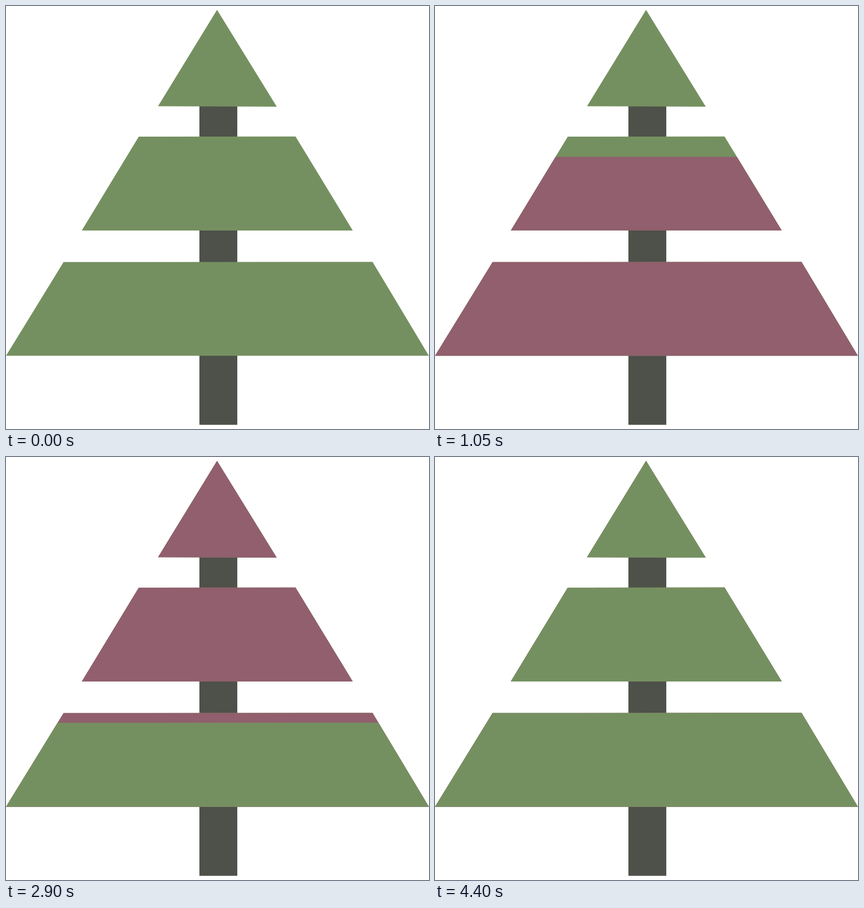
An HTML page that plays this animation: 748x748 px, repeating every 5 s.

```html
<!DOCTYPE html>
<html lang="en">
<head>
<meta charset="utf-8">
<title>Tree</title>
<style>
  html, body { margin: 0; width: 100%; height: 100%; overflow: hidden; background: #fff; }
  svg { display: block; width: 100%; height: 100%; }
</style>
</head>
<body>
<svg id="stage" viewBox="0 0 748 748">
  <rect x="342" y="100" width="67" height="640.6" fill="#4e5149"/>
</svg>
<script>
const LOOP = 5000, STEP = 50, STEPS = 10;
const GREEN = '#759060', RED = '#915f6d';

// Corners: top left, top right, bottom right, bottom left.
const tiers = [
  { corners: [[101.8, 452.8], [648.2, 452.4], [747.8, 618.6], [0, 618.6]], red: 50, green: 2550 },
  { corners: [[234.8, 230.9], [512, 230.7], [613.2, 397.1], [134, 397.1]], red: 750, green: 3250 },
  { corners: [[373.2, 6.8], [373.2, 6.8], [478.8, 178], [268.8, 177.2]], red: 1450, green: 3950 }
];

const stage = document.getElementById('stage');

function addShape(fill) {
  const shape = document.createElementNS('http://www.w3.org/2000/svg', 'polygon');
  shape.setAttribute('fill', fill);
  return stage.appendChild(shape);
}

const mix = (a, b, amount) => a.map((v, i) => v + (b[i] - v) * amount);

// Part of a tier filled from its base upwards.
function fillTier(shape, [topLeft, topRight, right, left], amount) {
  const points = [mix(left, topLeft, amount), mix(right, topRight, amount), right, left];
  shape.setAttribute('points', amount > 0 ? points.join(' ') : '');
}

// Smoothstep, held for each 50 ms step.
function progress(time, start) {
  const step = Math.floor((time - start) / STEP) + 1;
  const x = Math.min(Math.max(step / STEPS, 0), 1);
  return x * x * (3 - 2 * x);
}

for (const tier of tiers) {
  fillTier(addShape(GREEN), tier.corners, 1);
  tier.redShape = addShape(RED);
  tier.greenShape = addShape(GREEN);
}

function render(time) {
  for (const tier of tiers) {
    fillTier(tier.redShape, tier.corners, progress(time, tier.red));
    fillTier(tier.greenShape, tier.corners, progress(time, tier.green));
  }
}

const start = performance.now();
function tick() {
  render((performance.now() - start) % LOOP);
  requestAnimationFrame(tick);
}
tick();
</script>
</body>
</html>
```
